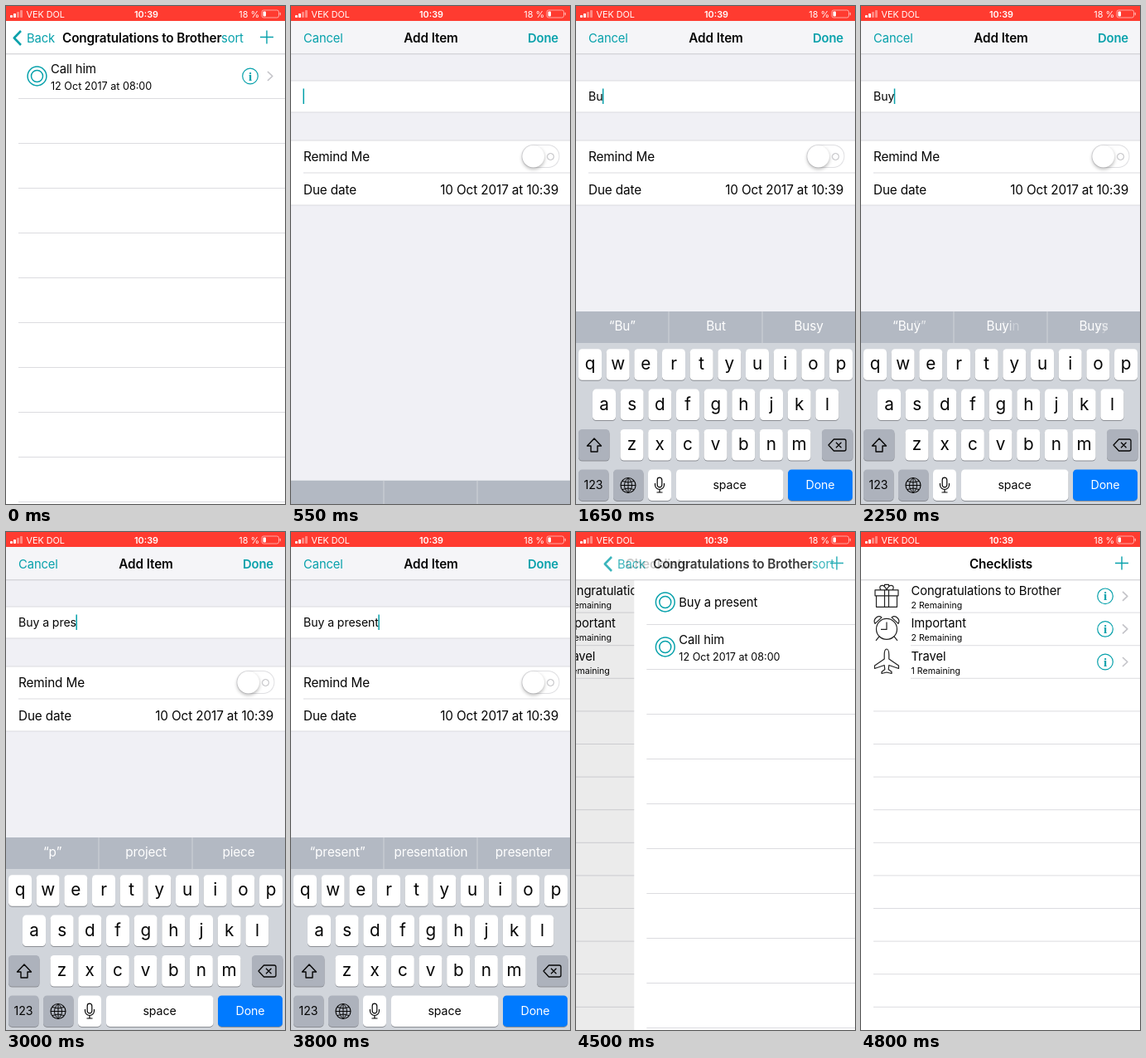
Recreate the animation shown at these times as an HTML page with a canvas. Size 337 px wide and 600 px high, loop 4850 ms.

```html
<!DOCTYPE html>
<html lang="en">
<head>
<meta charset="utf-8">
<title>Adding a checklist item</title>
<style>
html, body { margin: 0; width: 100%; height: 100%; overflow: hidden; background: #fff; }
canvas { display: block; width: 337px; height: 600px; }
</style>
</head>
<body>
<canvas></canvas>
<script>
const W = 337, H = 600, LOOP = 4850;
const TEAL = '#07a1ab', BLACK = '#050505', LINE = '#dcdce0', RED = '#ff3b30';
const SMALL = 10.6, FIELD = 14.2, MEDIUM = 14.8, LARGE = 15.3;
const canvas = document.querySelector('canvas');
const ctx = canvas.getContext('2d');
const scale = window.devicePixelRatio || 1;
canvas.width = W * scale;
canvas.height = H * scale;

// [time the letter appears, letter]
const taps = [[1000, 'B'], [1200, 'u'], [2150, 'y'], [2370, ' '], [2480, 'a'], [2560, ' '],
  [2650, 'p'], [2760, 'r'], [2860, 'e'], [2970, 's'], [3220, 'e'], [3330, 'n'], [3440, 't']];
const PRESS = 90;
const suggestions = [
  [0, '', '', ''],
  [1050, '“B”', 'But', 'Because'],
  [1350, '“Bu”', 'But', 'Busy'],
  [2200, '“Buy”', 'Buying', 'Buys'],
  [2750, '“p”', 'project', 'piece'],
  [3080, '“pres”', 'present', 'pressure'],
  [3420, '“present”', 'presentation', 'presenter']];

const clamp = v => Math.max(0, Math.min(1, v));
const progress = (t, from, to) => clamp((t - from) / (to - from));
const easeOut = p => 1 - (1 - p) ** 3;
const easeInOut = p => p * p * (3 - 2 * p);

function setFont(size, weight = 400) {
  ctx.font = `${weight} ${size}px Inter, Roboto, sans-serif`;
  ctx.letterSpacing = size > 14 ? '-0.12px' : '0px';
}
function text(str, x, y, { size = LARGE, color = BLACK, align = 'left', weight = 400 } = {}) {
  setFont(size, weight);
  ctx.textAlign = align;
  ctx.fillStyle = color;
  ctx.fillText(str, x, y);
}
function rect(x, y, w, h, color) {
  ctx.fillStyle = color;
  ctx.fillRect(x, y, w, h);
}
function rounded(x, y, w, h, r, color) {
  ctx.beginPath();
  ctx.roundRect(x, y, w, h, r);
  ctx.fillStyle = color;
  ctx.fill();
}
function ring(x, y, r, color, width) {
  ctx.beginPath();
  ctx.arc(x, y, r, 0, 7);
  ctx.strokeStyle = color;
  ctx.lineWidth = width;
  ctx.stroke();
}
function stroke(x, y, d, color, width, fill) {
  ctx.save();
  ctx.translate(x, y);
  const path = new Path2D(d);
  ctx.lineJoin = 'round';
  ctx.strokeStyle = color;
  ctx.lineWidth = width;
  if (fill) { ctx.fillStyle = fill; ctx.fill(path); }
  ctx.stroke(path);
  ctx.restore();
}
const hLine = (x, y, color = LINE) => rect(x, y - 0.5, W - x, 1, color);

function statusBar() {
  const white = '#fff';
  rect(0, 0, W, 18, RED);
  for (let i = 0; i < 4; i++) {
    rounded(5 + i * 4, 11 - i * 2, 3, 3 + i * 2, 0.8, i < 2 ? white : 'rgba(255,255,255,.4)');
  }
  text('VEK DOL', 24.5, 13.5, { size: 10.8, color: white });
  text('10:39', 169.5, 13.5, { size: 10.8, color: white, align: 'center', weight: 600 });
  text('18 %', 306, 13.5, { size: 10.8, color: white, align: 'right' });
  ctx.beginPath();
  ctx.roundRect(309, 5, 20.5, 9, 2.2);
  ctx.strokeStyle = 'rgba(255,255,255,.6)';
  ctx.lineWidth = 0.9;
  ctx.stroke();
  rounded(310.5, 6.5, 3.5, 6, 1, white);
  rounded(330.6, 7.7, 1.3, 3.6, 0.6, 'rgba(255,255,255,.6)');
}

function rowAccessory(y) {
  ring(295, y, 9.3, TEAL, 1.2);
  ctx.font = 'bold 15px "Liberation Serif", serif';
  ctx.textAlign = 'center';
  ctx.fillStyle = TEAL;
  ctx.fillText('i', 295, y + 5);
  stroke(319, y, 'M-3-5.5 2.8 0-3 5.5', '#c4c4c9', 1.7);
}
const plus = () => stroke(315, 37.5, 'M-8 0H8M0-8V8', TEAL, 1.4);

function itemList(items) {
  return {
    navColor: '#fff',
    nav(dx) {
      stroke(9 + dx, 38.5, 'M9-8.5 .8 0 9 8.5', TEAL, 2.6);
      text('Back', 25 + dx, 43.5, { size: MEDIUM, color: TEAL });
      text('Congratulations to Brother', 68 + dx, 43.5, { weight: 600 });
      text('sort', 260 + dx, 43.5, { size: MEDIUM, color: TEAL });
      plus();
    },
    body() {
      rect(0, 58, W, H - 58, '#fff');
      for (let i = 1; i <= 10; i++) hLine(15, 57.5 + i * 54);
      items.forEach(([name, date], i) => {
        const y = 84.5 + i * 54;
        ring(37.5, y, 11.4, TEAL, 1.5);
        ring(37.5, y, 7, TEAL, 1.5);
        text(name, 54, y + (date ? -4 : 5.5), { size: MEDIUM });
        if (date) text(date, 54, y + 16, { size: 12.6 });
        rowAccessory(y);
      });
    }
  };
}
const callHim = ['Call him', '12 Oct 2017 at 08:00'];
const listBefore = itemList([callHim]);
const listAfter = itemList([['Buy a present'], callHim]);

const groups = [
  ['Congratulations to Brother', 2,
    'M-14-7H14V0H-14ZM-12.5 0V13.5H12.5V0M-2.5-7V13.5M2.5-7V13.5M0-7C-4-16-11-12-7-7M0-7C4-16 11-12 7-7M-2.5-10.5V-13.5H2.5V-10.5'],
  ['Important', 2,
    'M12.5 .5A12.5 12.5 0 1 1-12.5 .5A12.5 12.5 0 1 1 12.5 .5M0-8V1H-7M-14-6C-17-11-11-17-6-13.5ZM14-6C17-11 11-17 6-13.5ZM-9 9.5-13 14.5M9 9.5 13 14.5'],
  ['Travel', 1,
    'M0-15C2-15 2.8-11 2.8-8V-3L14.5 5V8.5L2.8 4.5 2.2 9.5 6 12.5V14.5L0 13-6 14.5V12.5L-2.2 9.5-2.8 4.5-14.5 8.5V5L-2.8-3V-8C-2.8-11-2-15 0-15Z']];
const checklists = {
  navColor: '#fff',
  nav(dx) {
    text('Checklists', 169 + dx, 43.5, { weight: 600, align: 'center' });
    plus();
  },
  body() {
    rect(0, 58, W, H - 58, '#fff');
    for (let i = 1; i <= 13; i++) hLine(i <= 3 ? 60 : 15, 57.5 + i * 39.6);
    groups.forEach(([name, left, icon], i) => {
      const y = 77.3 + i * 39.6;
      stroke(31, y - 0.5, icon, '#222', 1.2);
      text(name, 60.5, y - 1.5, { size: MEDIUM });
      text(left + ' Remaining', 60.5, y + 14.5, { size: SMALL });
      rowAccessory(y);
    });
  }
};

const addItem = {
  navColor: '#f5f5f8',
  nav(dx) {
    text('Cancel', 15, 43.5, { size: MEDIUM, color: TEAL });
    text('Add Item', 169 + dx, 43.5, { weight: 600, align: 'center' });
    text('Done', 323, 43.5, { size: MEDIUM, color: TEAL, weight: 600, align: 'right' });
  },
  body(t) {
    rect(0, 58, W, H - 58, '#f0f0f5');
    for (const [top, bottom] of [[90, 128], [162, 240]]) {
      rect(0, top, W, bottom - top, '#fff');
      hLine(0, top);
      hLine(0, bottom);
    }
    const typed = taps.filter(tap => t >= tap[0]).map(tap => tap[1]).join('');
    text(typed, 15, 114, { size: FIELD });
    rect(14.5 + ctx.measureText(typed).width, 99.5, 1.5, 18.5, TEAL);

    hLine(15, 201);
    text('Remind Me', 15, 186.5);
    text('Due date', 15, 226.5);
    text('10 Oct 2017 at 10:39', 323, 226.5, { align: 'right' });
    rounded(278.5, 167, 46, 28, 14, '#dfdfe2');
    rounded(279.5, 168, 44, 26, 13, '#fff');
    ring(313.5, 181.5, 4, '#b9b9bd', 1);
    ctx.save();
    ctx.shadowColor = 'rgba(0,0,0,.3)';
    ctx.shadowBlur = 4 * scale;
    ctx.shadowOffsetY = 2 * scale;
    rounded(279.5, 168, 26.5, 26.5, 13.25, '#fff');
    ctx.restore();
  }
};

// Shared leading letters stay put; the others fade in from left to right.
function morph(cx, from, to, k) {
  setFont(LARGE);
  ctx.textAlign = 'left';
  ctx.fillStyle = '#fff';
  const width = str => ctx.measureText(str).width;
  const start = cx - Math.max(20, width(from)) / 2, end = cx - width(to) / 2;
  const x = end + (start - end) * (1 - k) ** 2;
  let same = 0;
  while (same < to.length && from[same] === to[same]) same++;
  const letters = (str, first, alpha) => {
    for (let i = first; i < str.length; i++) {
      ctx.globalAlpha = clamp(alpha(i));
      ctx.fillText(str[i], x + width(str.slice(0, i)), 391);
    }
  };
  letters(from, same, () => (1 - k) ** 4);
  letters(to, 0, i => k === 1 ? 1 : 4 * k - 0.35 * Math.max(0, i - same));
  ctx.globalAlpha = 1;
}

function key(x, y, w, color = '#fff') {
  rounded(x, y + 1, w, 37.5, 4.5, '#8b8e94');
  rounded(x, y, w, 37.5, 4.5, color);
}

function popup(cx, top, letter) {
  const left = Math.max(2, Math.min(W - 53, cx - 25.5)), right = left + 51;
  const y = top - 59;
  ctx.save();
  ctx.shadowColor = 'rgba(0,0,0,.25)';
  ctx.shadowBlur = 3 * scale;
  ctx.beginPath();
  ctx.moveTo(left + 8, y);
  ctx.arcTo(right, y, right, y + 8, 8);
  ctx.lineTo(right, y + 40);
  ctx.bezierCurveTo(right, y + 52, cx + 14, y + 50, cx + 14, y + 63);
  ctx.arcTo(cx + 14, top + 37.5, cx, top + 37.5, 4.5);
  ctx.arcTo(cx - 14, top + 37.5, cx - 14, top, 4.5);
  ctx.lineTo(cx - 14, y + 63);
  ctx.bezierCurveTo(cx - 14, y + 50, left, y + 52, left, y + 40);
  ctx.arcTo(left, y, left + 8, y, 8);
  ctx.fillStyle = '#fff';
  ctx.fill();
  ctx.restore();
  text(letter, (left + right) / 2, y + 37, { size: 31, align: 'center' });
}

function keyboard(t) {
  const dark = '#adb2bc';
  rect(0, 368, W, 232, '#d1d5db');
  rect(0, 368, W, 38, '#b3b9c3');
  for (const x of [111.5, 224.5]) rect(x, 368, 1, 38, '#d0d4da');
  const index = suggestions.findLastIndex(s => t >= s[0]);
  const current = suggestions[index], previous = suggestions[Math.max(0, index - 1)];
  const k = progress(t, current[0], current[0] + 200);
  [56, 169, 281].forEach((x, i) => morph(x, previous[i + 1], current[i + 1], k));

  const rowY = i => 413.2 + i * 48.4;
  const upper = t < taps[0][0];
  const tap = taps.find(([time]) => t >= time - PRESS && t < time);
  const pressed = tap && tap[1].toLowerCase();
  let pop = null;
  [['qwertyuiop', 17], ['asdfghjkl', 34], ['zxcvbnm', 67.5]].forEach(([row, x0], r) => {
    [...row].forEach((letter, i) => {
      const x = x0 + i * 33.67, y = rowY(r), label = upper ? letter.toUpperCase() : letter;
      key(x - 14, y, 28);
      if (letter === pressed) pop = [x, y, label];
      else text(label, x, y + 25, { size: 20.7, align: 'center' });
    });
  });

  key(3, rowY(2), 37.5, upper ? '#fff' : dark);
  stroke(22, 529.5, 'M0-8.5 8.5 .5H4V7.5H-4V.5H-8.5Z', BLACK, 1.4, upper && BLACK);
  key(297, rowY(2), 37.5, dark);
  stroke(316, 529, 'M-4.5-7H8Q10-7 10-5V5Q10 7 8 7H-4.5L-11 0ZM-2-3.2 4.5 3.2M4.5-3.2-2 3.2', BLACK, 1.3);

  const y = rowY(3), label = { size: FIELD, align: 'center' };
  key(3, y, 36.5, dark);
  text('123', 21, y + 24, label);
  key(45, y, 36.5, dark);
  ring(63, 577.5, 9, BLACK, 1.1);
  stroke(63, 577.5, 'M0-9V9M-9 0H9M0-9C-6-4-6 4 0 9C6 4 6-4 0-9M-7-5Q0-2 7-5M-7 5Q0 2 7 5', BLACK, 1);
  key(87, y, 28);
  stroke(101, 577, 'M-2.8-6A2.8 2.8 0 0 1 2.8-6V0A2.8 2.8 0 0 1-2.8 0ZM-5.5-2V0A5.5 5.5 0 0 0 5.5 0V-2M0 5.5V9M-3.5 9H3.5', BLACK, 1.2);
  key(121, y, 129.5, pressed === ' ' ? dark : '#fff');
  text('space', 185.5, y + 23.5, label);
  key(256, y, 78, '#007aff');
  text('Done', 295, y + 24, { ...label, color: '#fff' });
  if (pop) popup(...pop);
}

// p = 0 shows the lower screen, p = 1 the upper one.
function slide(lower, upper, p, t) {
  const shifted = (dx, draw) => {
    ctx.save();
    ctx.translate(dx, 0);
    draw();
    ctx.restore();
  };
  if (p < 1) shifted(-100 * p, () => lower.body(t));
  if (p > 0) {
    rect(0, 58, W, H, `rgba(0,0,0,${0.1 * p})`);
    shifted(W * (1 - p), () => upper.body(t));
  }
  rect(0, 18, W, 40, lower.navColor);
  ctx.globalAlpha = p;
  rect(0, 18, W, 40, upper.navColor);
  upper.nav(120 * (1 - p));
  ctx.globalAlpha = 1 - p;
  lower.nav(-90 * p);
  ctx.globalAlpha = 1;
  hLine(0, 57.8, '#c9c9cd');
}

function draw(now) {
  const t = now % LOOP;
  ctx.setTransform(scale, 0, 0, scale, 0, 0);
  rect(0, 0, W, H, '#fff');
  if (t < 3900) slide(listBefore, addItem, easeOut(progress(t, 280, 540)), t);
  else if (t < 4460) slide(listAfter, addItem, 1 - easeOut(progress(t, 3920, 4130)), t);
  else slide(checklists, listAfter, 1 - easeOut(progress(t, 4480, 4760)), t);

  const raised = easeOut(progress(t, 540, 800)) - easeInOut(progress(t, 4170, 4440));
  if (raised > 0) {
    ctx.save();
    ctx.translate(0, 232 * (1 - raised));
    keyboard(t);
    ctx.restore();
  }
  statusBar();
  requestAnimationFrame(draw);
}
requestAnimationFrame(draw);
</script>
</body>
</html>
```
